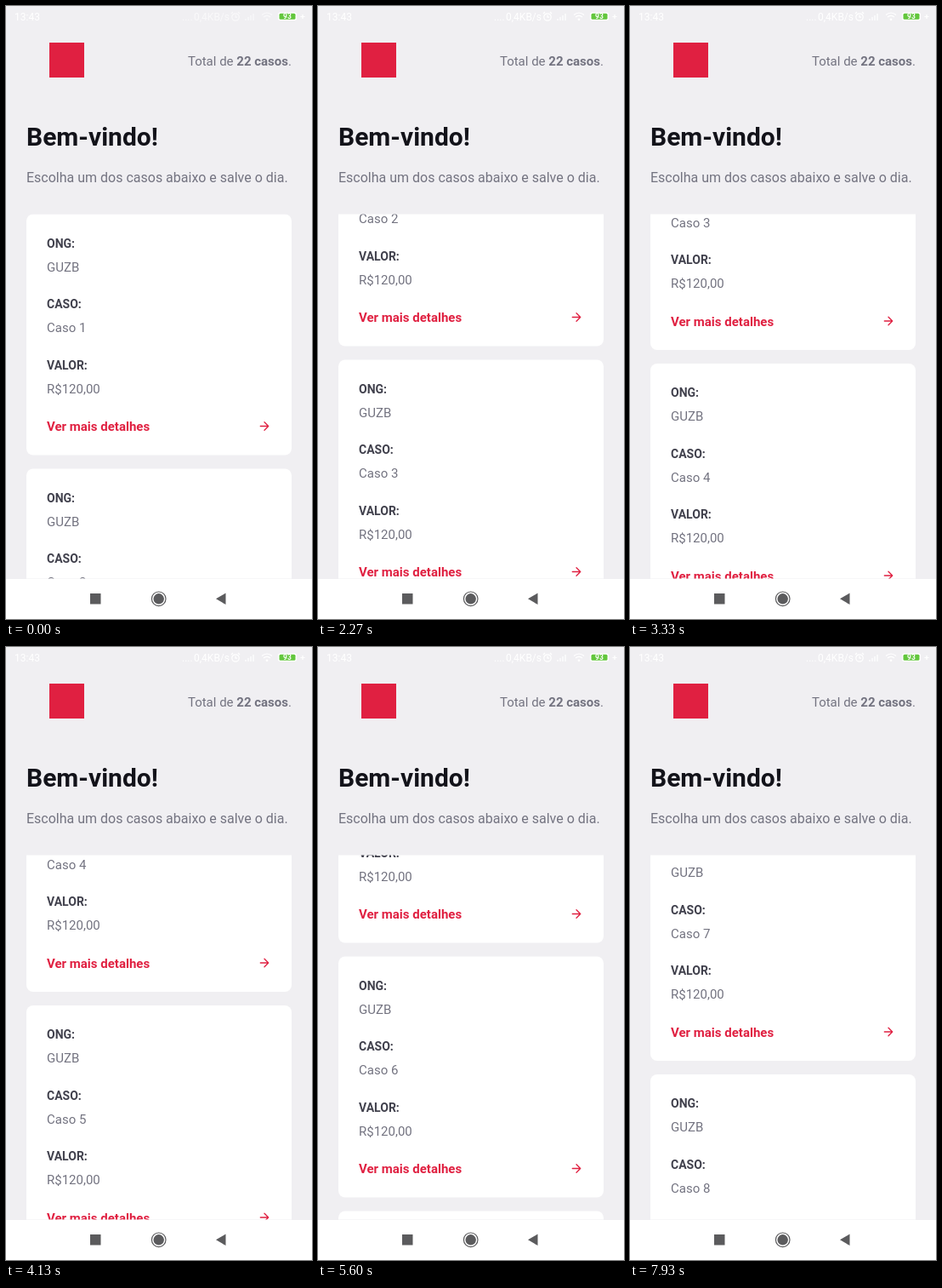
Write an HTML page that moves like this. It is 360x720 px and loops after 8000 ms.

```html
<!DOCTYPE html>
<html lang="pt-BR">
<head>
<meta charset="utf-8">
<title>Casos</title>
<style>
  html, body { margin: 0; width: 100%; height: 100%; overflow: hidden; background: #f0eff2; }
  svg { display: block; width: 360px; height: 720px; font-family: Roboto, "Noto Sans", sans-serif; }
  .title { font-size: 30px; font-weight: 700; fill: #13131a; }
  .lead { font-size: 16px; fill: #737380; }
  .total { font-size: 15px; fill: #737380; text-anchor: end; }
  .label { font-size: 14px; font-weight: 700; fill: #41414d; }
  .value { font-size: 15px; fill: #737380; }
  .link { font-size: 15px; font-weight: 700; fill: #e02041; }
  .arrow { fill: none; stroke: #e02041; stroke-width: 1.33; stroke-linecap: round; stroke-linejoin: round; }
  .status { font-size: 12px; fill: #fff; }
  .status .line { fill: none; stroke: #fff; stroke-width: 1.2; }
  .nav { fill: #5b5b5d; }
  .b { font-weight: 700; }
</style>
</head>
<body>
<svg viewBox="0 0 360 720">
  <defs>
    <clipPath id="view"><rect y="244.5" width="360" height="428"/></clipPath>
  </defs>
  <rect width="360" height="720" fill="#f0eff2"/>

  <g class="status">
    <text x="10" y="17">13:43</text>
    <g id="icons">
      <text x="207" y="17">....</text>
      <text x="221" y="17">0,4KB/s</text>
      <circle class="line" cx="270" cy="13" r="4.2"/>
      <path class="line" d="M270 10.5v2.7h2M265 9l2-2M275 9l-2-2"/>
      <path d="M281 17v-2h2v2zM284 17v-4h2v4zM287 17v-6h2v6zM290 17v-8h2v8z" opacity=".6"/>
      <path class="line" d="M301 10.5q6-5 12 0M303 13q4-3.4 8 0"/>
      <circle cx="307" cy="15.8" r="1.4"/>
    </g>
    <rect x="320" y="7.5" width="22" height="9.5" rx="2.5"/>
    <rect x="321.5" y="8.8" width="19" height="7" rx="1.5" fill="#62c63c"/>
    <text x="331" y="15.4" font-size="8.5" class="b" text-anchor="middle">93</text>
    <path class="line" d="M346.500 12.500h5M349 10v5"/>
  </g>

  <rect x="51" y="43" width="41" height="41" fill="#e02041"/>
  <text class="total" x="336" y="70">Total de <tspan class="b">22 casos</tspan>.</text>
  <text class="title" x="24" y="164">Bem-vindo!</text>
  <text class="lead" x="24" y="207">Escolha um dos casos abaixo e salve o dia.</text>

  <g clip-path="url(#view)"><g id="list"></g></g>

  <rect y="673" width="360" height="47" fill="#fff"/>
  <g class="nav">
    <rect x="99" y="690" width="12.500" height="12.500"/>
    <circle cx="179.700" cy="696.300" r="6.200"/>
    <circle cx="179.700" cy="696.300" r="8.300" fill="none" stroke="#5b5b5d" stroke-width="1.200"/>
    <path d="M247 696.300L258.500 689.500V703z"/>
  </g>
</svg>
<script>
  const LOOP = 8000, FPS = 15, TICKS = 120, PITCH = 299;
  const list = document.getElementById('list');
  const icons = document.getElementById('icons');

  const text = (cls, y, s) => `<text class="${cls}" x="48" y="${y}">${s}</text>`;

  function card(n) {
    const rows = [['ONG:', 'GUZB'], ['CASO:', 'Caso ' + n], ['VALOR:', 'R$120,00']];
    const body = rows.map(([label, value], i) =>
      text('label', 39 + i * 71.5, label) + text('value', 67.3 + i * 71.5, value)).join('');
    return `<g transform="translate(0 ${244.5 + (n - 1) * PITCH})">
      <rect x="24" width="312" height="283" rx="8" fill="#fff"/>${body}
      ${text('link', 254.7, 'Ver mais detalhes')}
      <path class="arrow" d="M299.300 249h9.400M304 244.300l4.700 4.700l-4.700 4.700"/></g>`;
  }
  list.innerHTML = Array.from({ length: 9 }, (_, i) => card(i + 1)).join('');

  // Scroll knots: tick, offset, speed in, speed out (px per tick)
  const knots = [
    [0, 0, 0, 0], [24, 0, 0, 20], [34, 427, 24, 24], [50, 721.5, 20, 20],
    [62, 1019.5, 24, 24], [72, 1210, 0, 0], [74, 1210, 0, 30], [84, 1376, 0, 0],
    [86, 1376, 0, 30], [95, 1530, 0, 0], [97, 1530, 0, 28], [101, 1647.5, 20, 20],
    [105, 1690, 0, 0], [108, 1690, 0, 33], [115, 1826, 0, 0], [118, 1826, 0, 9],
    [119, 1835.5, 9, 0], [120, 1835.5, 0, 0]
  ];

  function scrollAt(tick) {
    const i = knots.findIndex(k => k[0] > tick);
    const [t0, p0, , v0] = knots[i - 1], [t1, p1, v1] = knots[i];
    const d = t1 - t0, u = (tick - t0) / d, w = 1 - u;
    return p0 * w * w * (1 + 2 * u) + p1 * u * u * (3 - 2 * u)
         + d * u * w * (v0 * w - v1 * u);
  }

  const start = performance.now();
  function draw(now) {
    const t = Math.max(0, now - start) % LOOP;
    const tick = Math.floor((t + 4) * FPS / 1000) % TICKS;
    list.setAttribute('transform', `translate(0 ${-scrollAt(tick).toFixed(2)})`);
    icons.setAttribute('opacity', Math.min(1, Math.max(0.6, 0.5 + tick / 12)));
    requestAnimationFrame(draw);
  }
  draw(start);
</script>
</body>
</html>
```
